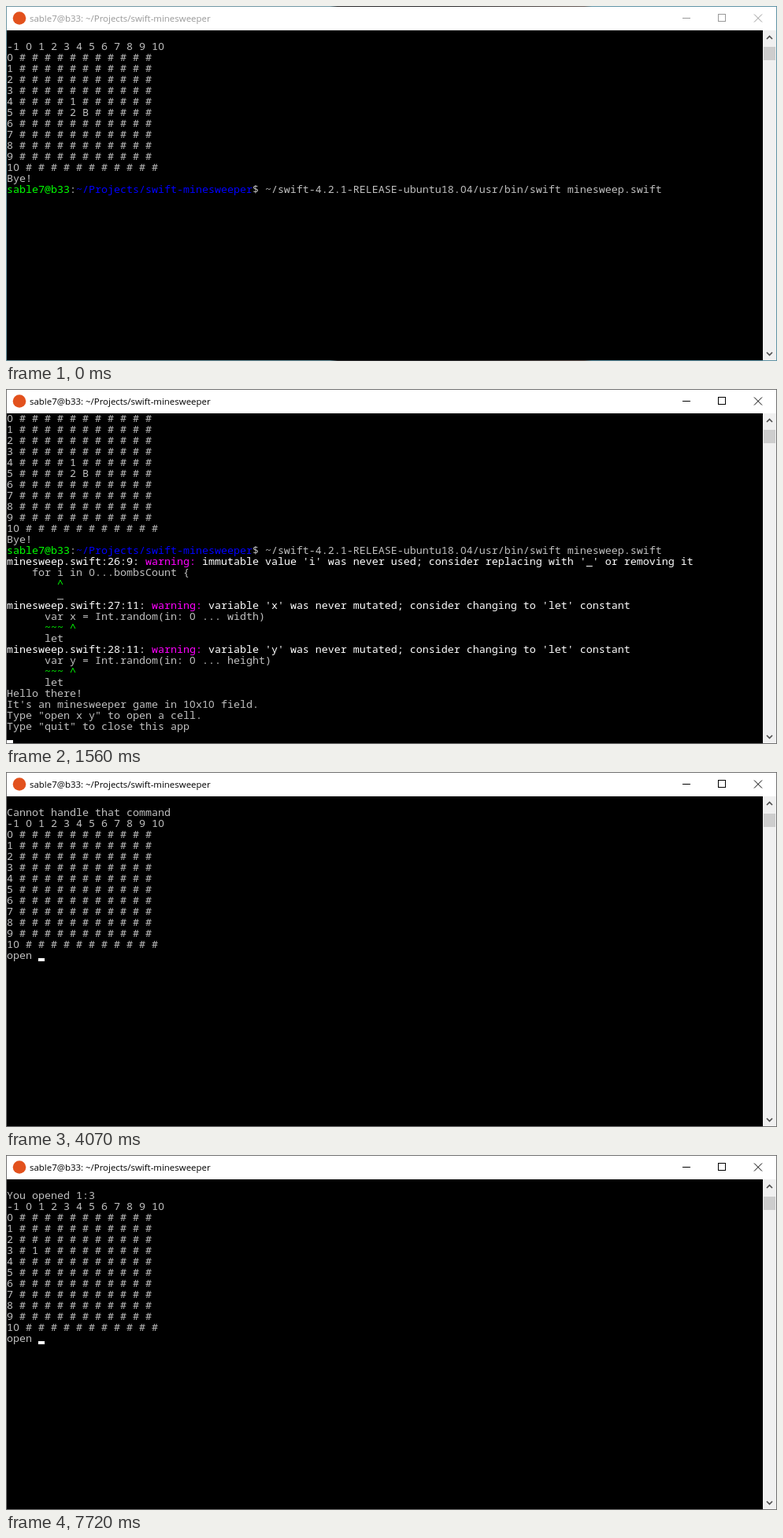
Animation, 979 px wide and 452 px high, one loop 8000 ms. Source, as an HTML page:

```html
<!DOCTYPE html>
<html lang="en">
<head>
<meta charset="utf-8">
<title>Terminal minesweeper</title>
<style>
  html, body { margin: 0; width: 100%; height: 100%; overflow: hidden; background: #000; }
  #win { position: absolute; left: 0; top: 0; width: 979px; height: 452px; overflow: hidden; background: #707070; }
  #win.idle { background: linear-gradient(90deg, #6f97a3 42%, #2a2a2c 43%, #2a2a2c 57%, #665c58 75%, #5f93a5 76%); }
  #bar { position: absolute; left: 1px; top: 1px; width: 977px; height: 30px; background: #fff; color: #000; }
  .idle #bar { color: #999; }
  #name { position: absolute; left: 29px; top: 0; font: 11.45px/30px "Open Sans", sans-serif; white-space: pre; }
  #bar svg, #scroll svg { position: absolute; left: 0; top: 0; fill: none; }
  #term { position: absolute; left: 1px; top: 31px; width: 960px; height: 420px; overflow: hidden; background: #000; }
  #text { position: absolute; left: 0; top: -1px; margin: 0; color: #c0c0c0;
    font: 13.3333px/14px "Noto Sans Mono", monospace; font-variant-ligatures: none; }
  #text div { height: 14px; white-space: pre; }
  #text b { display: inline-block; width: 8px; font: 13.3333px/14px "Noto Sans", sans-serif; text-align: center; }
  .w { color: #fff; } .g { color: #0f0; } .b { color: #00f; } .m { color: #f0f; }
  #cursor { position: absolute; width: 8px; height: 4px; background: #fff; }
  #scroll { position: absolute; left: 961px; top: 31px; width: 17px; height: 420px; background: #f0f0f0; }
  #thumb { position: absolute; left: 1px; width: 15px; height: 17px; background: #cdcdcd; }
</style>
</head>
<body>
<div id="win">
  <div id="bar">
    <svg width="977" height="30" stroke="currentColor">
      <circle cx="16" cy="14.5" r="8.3" fill="#e2511d" stroke="none"/>
      <path d="M858 14.5h10M903.5 9.5h9v9h-9z" shape-rendering="crispEdges"/>
      <path d="M949 9.5l10 10M959 9.5l-10 10"/>
    </svg>
    <div id="name">sable7@b33: ~/Projects/swift-minesweeper</div>
  </div>
  <div id="term"><div id="text"></div><div id="cursor"></div></div>
  <div id="scroll">
    <div id="thumb"></div>
    <svg width="17" height="420" stroke="#505050" stroke-width="1.7">
      <path d="M5 11l3.5-3.5L12 11M5 410l3.5 3.5L12 410"/>
    </svg>
  </div>
</div>
<script>
const LOOP = 8000, CW = 8, LH = 14;
const $ = id => document.getElementById(id);
const tint = (c, s) => `<span class="${c}">${s}</span>`;

// Field listing; opened maps "row,col" to the shown value.
function field(opened) {
  const ids = [...Array(11).keys()];
  const row = r => r + ' ' + ids.map(c => opened[r + ',' + c] || '#').join(' ');
  return ['-1 ' + ids.join(' '), ...ids.map(row)];
}

const warn = (pos, msg) =>
  tint('w', `minesweep.swift:${pos}: `) + tint('m', 'warning: ') + tint('w', msg);

const unchanged = (pos, v, size) => [
  warn(pos, `variable '${v}' was never mutated; consider changing to 'let' constant`),
  `      var ${v} = Int.random(in: 0 ... ${size})`,
  tint('g', '      ~~~ ^'),
  '      let'
];

const shell = [
  '', ...field({ '4,4': 1, '5,4': 2, '5,5': 'B' }), 'Bye!',
  tint('g', 'sable7@b33') + ':' + tint('b', '~/Projects/swift-minesweeper') +
    '$ ~/swift-4.2.1-RELEASE-ubuntu18.04/usr/bin/swift minesweep.swift '
];
const compiled = [
  ...shell,
  warn('26:9', "immutable value 'i' was never used; consider replacing with '_' or removing it"),
  '    for i in 0...bombsCount {',
  tint('g', '        ^'),
  '        _',
  ...unchanged('27:11', 'x', 'width'),
  ...unchanged('28:11', 'y', 'height')
];
const greeting = [
  ...compiled.slice(2),
  'Hello there!',
  "It's an minesweeper game in 10x10 field.",
  'Type "open x y" to open a cell.',
  'Type "quit" to close this app'
];
const failed = ['', 'Cannot handle that command', ...field({})];
const opened = ['', 'You opened 1:3', ...field({ '3,1': 1 })];

// start ms, lines, typed input, cursor column (-1 hides it)
const steps = [
  [0, shell, '', -1], [360, shell, '', -1], [820, shell, '', 105],
  [1000, shell, '', 0], [1100, compiled, '', 0],
  [1560, greeting, '', 0], [2400, greeting, '', -1],
  ...session(failed, [[2680, ''], [3530, null], [3710, 'op'], [3890, 'ope'], [3980, 'open'],
    [4070, 'open '], [4730, 'open 1'], [4910, 'open 1 '], [5090, 'open 1 3']]),
  ...session(opened, [[5840, ''], [6690, null], [7150, ''], [7240, 'o'], [7340, 'op'],
    [7430, 'ope'], [7620, 'open'], [7720, 'open ']])
];

// Typing on the input row; null is an empty row with the cursor blinked off.
function session(lines, keys) {
  return keys.map(([t, s]) => [t, lines, s || '', s === null ? -1 : s.length]);
}

function show([t, lines, typed, col]) {
  $('win').className = t < 360 ? 'idle' : '';
  $('text').innerHTML = [...lines, typed]
    .map(s => `<div>${s.replace(/0/g, '<b>0</b>')}</div>`).join('');
  const row = t === 820 ? lines.length - 1 : lines.length;
  const cur = $('cursor').style;
  cur.display = col < 0 ? 'none' : 'block';
  cur.left = col * CW + 'px';
  cur.top = row * LH + 10 + 'px';
  $('thumb').style.top = (t < 2680 ? 21 : 22) + 'px';
}

let last = null;
function tick() {
  const t = performance.now() % LOOP;
  const step = steps.findLast(s => s[0] <= t);
  if (step !== last) show(last = step);
  requestAnimationFrame(tick);
}
tick();
</script>
</body>
</html>
```
